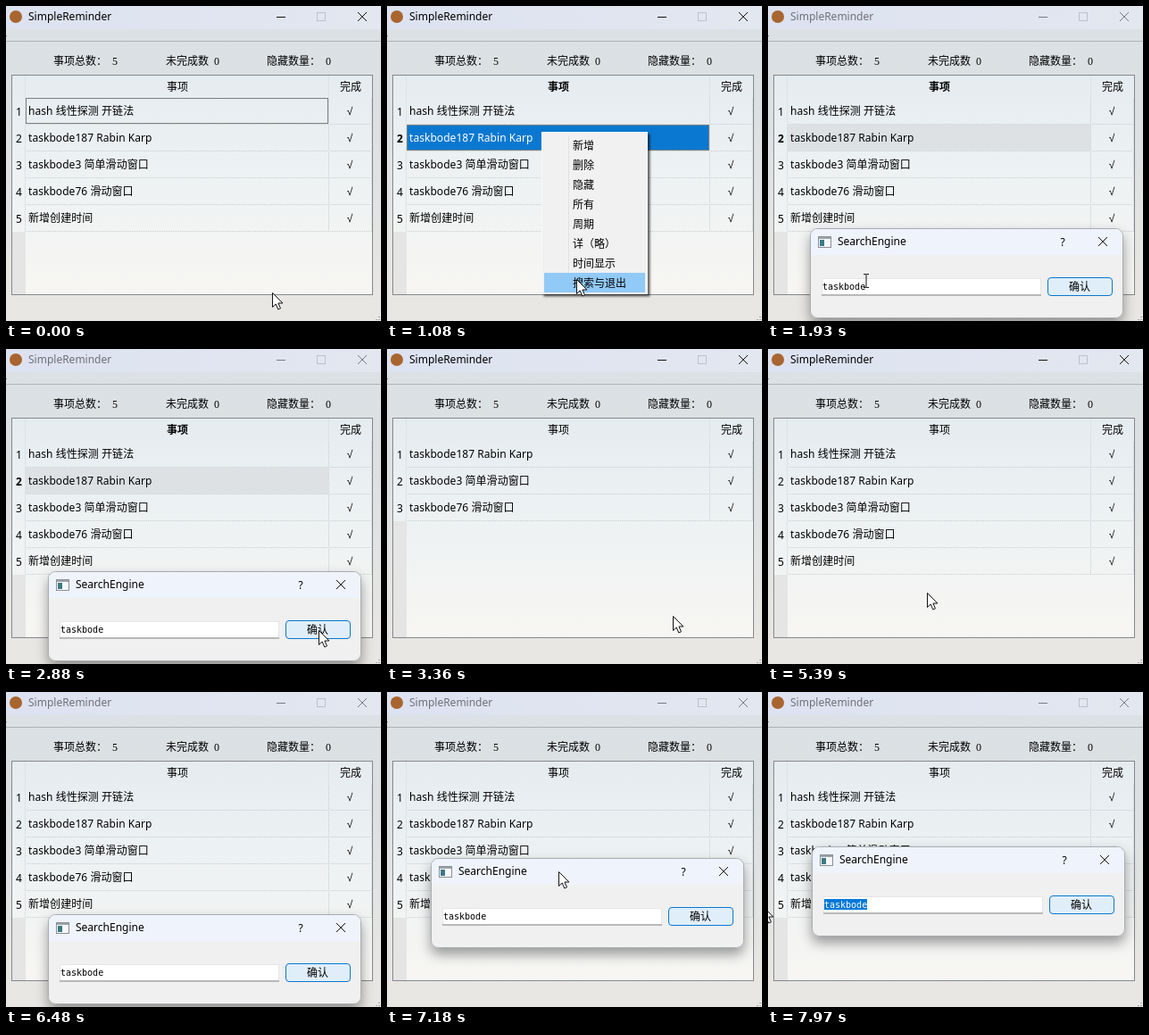
An HTML page that plays this animation: 420x353 px, repeating every 8000 ms.

```html
<!DOCTYPE html>
<html lang="zh">
<head>
<meta charset="utf-8">
<title>SimpleReminder</title>
<style>
html, body { margin: 0; width: 100%; height: 100%; overflow: hidden; }
svg { display: block; width: 100vw; height: 100vh; }
text { font: 12px "Noto Sans", "Noto Sans CJK SC", "Noto Sans CJK", sans-serif; fill: #000; white-space: pre; }
.mid { text-anchor: middle; }
.sum { font-family: "Liberation Serif", "Noto Sans CJK SC", "Noto Sans CJK", serif; }
.cell { letter-spacing: .05px; }
.bold { font-weight: 700; }
.tick { font-family: "Liberation Sans", sans-serif; }
.mono { font: 10px "DejaVu Sans Mono", monospace; }
.line { fill: none; stroke-width: 1; }
.dots { stroke: #c6cdd1; stroke-dasharray: 1 1; stroke-dashoffset: 1; }
</style>
</head>
<body>
<svg viewBox="0 0 420 353" preserveAspectRatio="none">
  <defs>
    <linearGradient id="bar"><stop offset="0" stop-color="#dce2f0"/><stop offset="1" stop-color="#e2e7f0"/></linearGradient>
    <linearGradient id="win" x2="0" y2="1"><stop offset="0" stop-color="#dbe1e6"/><stop offset=".3" stop-color="#dce0e2"/><stop offset="1" stop-color="#e9e7e3"/></linearGradient>
    <linearGradient id="tab" x2="0" y2="1"><stop offset="0" stop-color="#e5ecf0"/><stop offset=".5" stop-color="#eef2f3"/><stop offset="1" stop-color="#f7f6f3"/></linearGradient>
    <filter id="shade" x="-20%" y="-30%" width="140%" height="180%"><feDropShadow dx="0" dy="7" stdDeviation="7" flood-opacity=".38"/></filter>
    <filter id="drop" x="-10%" y="-10%" width="130%" height="130%"><feDropShadow dx="2.5" dy="2.5" stdDeviation="1" flood-opacity=".6"/></filter>
  </defs>

  <rect width="420" height="353" fill="url(#win)"/>
  <rect width="420" height="26" fill="url(#bar)"/>
  <path class="line" d="M0 39.5H420" stroke="#aeb2b6"/>
  <path class="line" d="M0 33.5H1" stroke="#777"/>
  <path class="line" d="M417 348.5h2M414 351.5h2M417 351.5h2" stroke="#a9a8a4" stroke-width="2"/>
  <circle cx="11" cy="12" r="7" fill="#a9652f"/>
  <g id="caption">
    <text x="25" y="16">SimpleReminder</text>
    <path class="line" d="M303 12.5H313M394 7l10 10m0-10l-10 10" stroke="#111"/>
  </g>
  <rect class="line" x="348.5" y="7.5" width="9" height="9" stroke="#bcc1ca"/>

  <text class="sum" x="53" y="66">事项总数：</text><text class="sum" x="119" y="66">5</text>
  <text class="sum" x="179" y="66">未完成数</text><text class="sum" x="233" y="66">0</text>
  <text class="sum" x="292" y="66">隐藏数量：</text><text class="sum" x="358" y="66">0</text>

  <rect x="6.5" y="77.5" width="404" height="246" fill="url(#tab)" stroke="#85888b"/>
  <g id="table"></g>

  <g id="menu">
    <rect x="-.5" y="-.5" width="118" height="181" fill="#f1f1f1" stroke="#f7f7f7" filter="url(#drop)"/>
    <path class="line" d="M29.5 3V178" stroke="#e2e2e2"/>
    <rect id="hover" x="2" width="113" height="22" fill="#91c9f7"/>
    <g id="items"></g>
  </g>

  <g id="dialog">
    <rect x=".5" y=".5" width="350" height="100" rx="8" fill="#f0f0f0" stroke="#a9acb1" filter="url(#shade)"/>
    <path d="M1 30V8.5a7.5 7.5 0 0 1 7.5-7.5H342.5a7.5 7.5 0 0 1 7.5 7.5V30z" fill="#eff3fb"/>
    <rect x="9.5" y="9.5" width="14" height="12" fill="#f8f8f8" stroke="#8a8f95"/>
    <path d="M10 10h13v2H10z" fill="#9aa4ad"/>
    <path d="M11 13h5v7H11z" fill="#3d7a86"/>
    <text x="31" y="19">SearchEngine</text>
    <text class="mid" x="283" y="19.5">?</text>
    <path class="line" d="M323 10l10 10m0-10l-10 10" stroke="#111"/>
    <rect x="13.5" y="56.5" width="245" height="18" fill="#fff" stroke="#e6e6e6"/>
    <path class="line" d="M13 75H259" stroke="#868686"/>
    <rect id="mark" y="59" height="12" fill="#0078d7"/>
    <text class="mono" x="14" y="69"><tspan id="plain"></tspan><tspan id="picked" fill="#fff"></tspan></text>
    <rect x="266.5" y="55.5" width="72" height="20" rx="3.5" fill="#e0eef9" stroke="#0a78cf"/>
    <text class="mid" x="302" y="70">确认</text>
  </g>

  <path id="arrow" d="M.5.5V16.5l3.700-3.500 2.600 6 2.700-1.200-2.600-5.800h5z" fill="#fff" stroke="#111"/>
  <path id="beam" class="line" d="M-3-7.500h2.500l.5.500.5-.5H3M0-7V7M-3 7.500h2.500l.5-.5.5.5H3" stroke="#111"/>
</svg>

<script>
const LOOP = 8000;
const QUERY = 'taskbode';
const ALL = ['hash 线性探测 开链法', QUERY + '187 Rabin Karp', QUERY + '3 简单滑动窗口', QUERY + '76 滑动窗口', '新增创建时间'];
const FOUND = ALL.filter(s => s.startsWith(QUERY));
const ITEMS = ['新增', '删除', '隐藏', '所有', '周期', '详（略）', '时间显示', '搜索与退出'];

// pointer path: time, x, y
const PATH = [
  [70, 298, 321], [480, 174, 142], [620, 174, 142], [1000, 212, 306], [1250, 212, 306],
  [1930, 110, 308], [2250, 66, 310], [2540, 112, 309], [2860, 350, 315], [3120, 350, 315],
  [3360, 320, 299], [3900, 160, 202], [4070, 150, 196], [4160, 150, 196], [4540, 185, 277],
  [4950, 185, 277], [5390, 178, 273], [5850, 178, 273], [6330, 215, 441], [6500, 215, 441],
  [6800, 190, 264], [6840, 190, 264], [7300, 192, 188], [7350, 192, 188], [7560, 112, 238],
  [7610, 112, 238], [7960, -6, 240]
];
// open, close, x, y
const MENUS = [[560, 1270, 174, 142], [4150, 4950, 150, 196], [5870, 6480, 178, 273]];
const SELECT = 520, OPEN = 1300, CONFIRM = 3110, RESET = 4950, REOPEN = 6480;
const GRAB = 6840, RELEASE = 7350, PICK = 7610;

const $ = id => document.getElementById(id);
const show = (el, on) => el.setAttribute('visibility', on ? 'visible' : 'hidden');
const move = (el, x, y) => el.setAttribute('transform', `translate(${x} ${y})`);
const label = (x, y, s, cls = '', fill = '#000') => `<text x="${x}" y="${y}" class="${cls}" style="fill:${fill}">${s}</text>`;
const focusBox = (y, color) => `<rect class="line" x="22.5" y="${y + .5}" width="338" height="28" stroke="${color}" stroke-dasharray="1 1"/>`;

$('items').innerHTML = ITEMS.map((s, i) => label(34, 18.5 + 22 * i, s)).join('');

function pointer(t) {
  const i = PATH.findIndex(p => p[0] > t);
  if (i === 0) return PATH[0].slice(1);
  if (i < 0) return PATH[PATH.length - 1].slice(1);
  const [t0, x0, y0] = PATH[i - 1], [t1, x1, y1] = PATH[i];
  const u = (t - t0) / (t1 - t0), k = u * u * (3 - 2 * u);
  return [Math.round(x0 + (x1 - x0) * k), Math.round(y0 + (y1 - y0) * k)];
}

function tableMarkup(rows, sel, active, focus) {
  const end = 103 + 30 * rows.length;
  let s = `<path d="M7 ${end}H22V323H7z" fill="#e4e5e4"/>`;
  s += label(192, 94.5, '事项', 'mid' + (sel >= 0 ? ' bold' : '')) + label(386, 94.5, '完成', 'mid');
  s += `<path class="line" d="M21.5 78V${end}M361.5 78V103" stroke="#dce2e6"/>`;
  s += `<path class="line dots" d="M361.5 103V${end}M409.5 103V${end}"/>`;
  rows.forEach((name, i) => {
    const y = 103 + 30 * i, on = i === sel;
    s += `<path class="line dots" d="M22 ${y + 29.5}H410"/>`;
    if (on) s += `<rect x="22" y="${y}" width="339" height="29" fill="${active ? '#0a78d0' : '#dde1e4'}"/>`;
    if (on && active) s += focusBox(y, '#e08a3c');
    s += label(14.5, y + 20, i + 1, 'mid' + (on ? ' bold' : ''));
    s += label(25, y + 19, name, 'cell', on && active ? '#fff' : '#000');
    s += label(385, y + 19, '√', 'mid tick');
  });
  if (focus) s += focusBox(103, '#111');
  return s;
}

let lastKey = '';
function render(t) {
  const [x, y] = pointer(t);
  const dialog = (t >= OPEN && t < CONFIRM) || t >= REOPEN;
  const found = t >= CONFIRM && t < RESET;
  const sel = t >= SELECT && t < CONFIRM ? 1 : -1;
  const key = [found, sel, dialog, t < SELECT].join();
  if (key !== lastKey) {
    lastKey = key;
    $('table').innerHTML = tableMarkup(found ? FOUND : ALL, sel, !dialog, t < SELECT);
    $('caption').setAttribute('opacity', dialog ? .5 : 1);
  }

  const menu = MENUS.find(m => t >= m[0] && t < m[1]);
  show($('menu'), menu);
  if (menu) {
    const row = Math.floor((y - menu[3] - 2) / 22);
    const over = x > menu[2] + 1 && row >= 0 && row < ITEMS.length;
    move($('menu'), menu[2], menu[3]);
    $('hover').setAttribute('y', 3 + 22 * row);
    $('hover').setAttribute('opacity', over ? 1 : 0);
  }

  let left = 47, top = 249;
  if (t >= GRAB) {
    const [gx, gy] = pointer(GRAB), [hx, hy] = pointer(Math.min(t, RELEASE));
    left += hx - gx;
    top += hy - gy;
  }
  show($('dialog'), dialog);
  move($('dialog'), left, top);

  const size = QUERY.length;
  const from = t < PICK ? size : Math.max(0, Math.min(size, Math.round((x - left - 14) / 6)));
  $('plain').textContent = QUERY.slice(0, from);
  $('picked').textContent = QUERY.slice(from);
  $('mark').setAttribute('x', 14 + 6 * from);
  $('mark').setAttribute('width', 6 * (size - from));

  const typing = dialog && x > left + 13 && x < left + 259 && y > top + 55 && y < top + 76;
  show($('beam'), typing);
  show($('arrow'), !typing);
  move($(typing ? 'beam' : 'arrow'), x, y);
}

const start = performance.now();
function tick() {
  render((performance.now() - start) % LOOP);
  requestAnimationFrame(tick);
}
tick();
</script>
</body>
</html>
```
